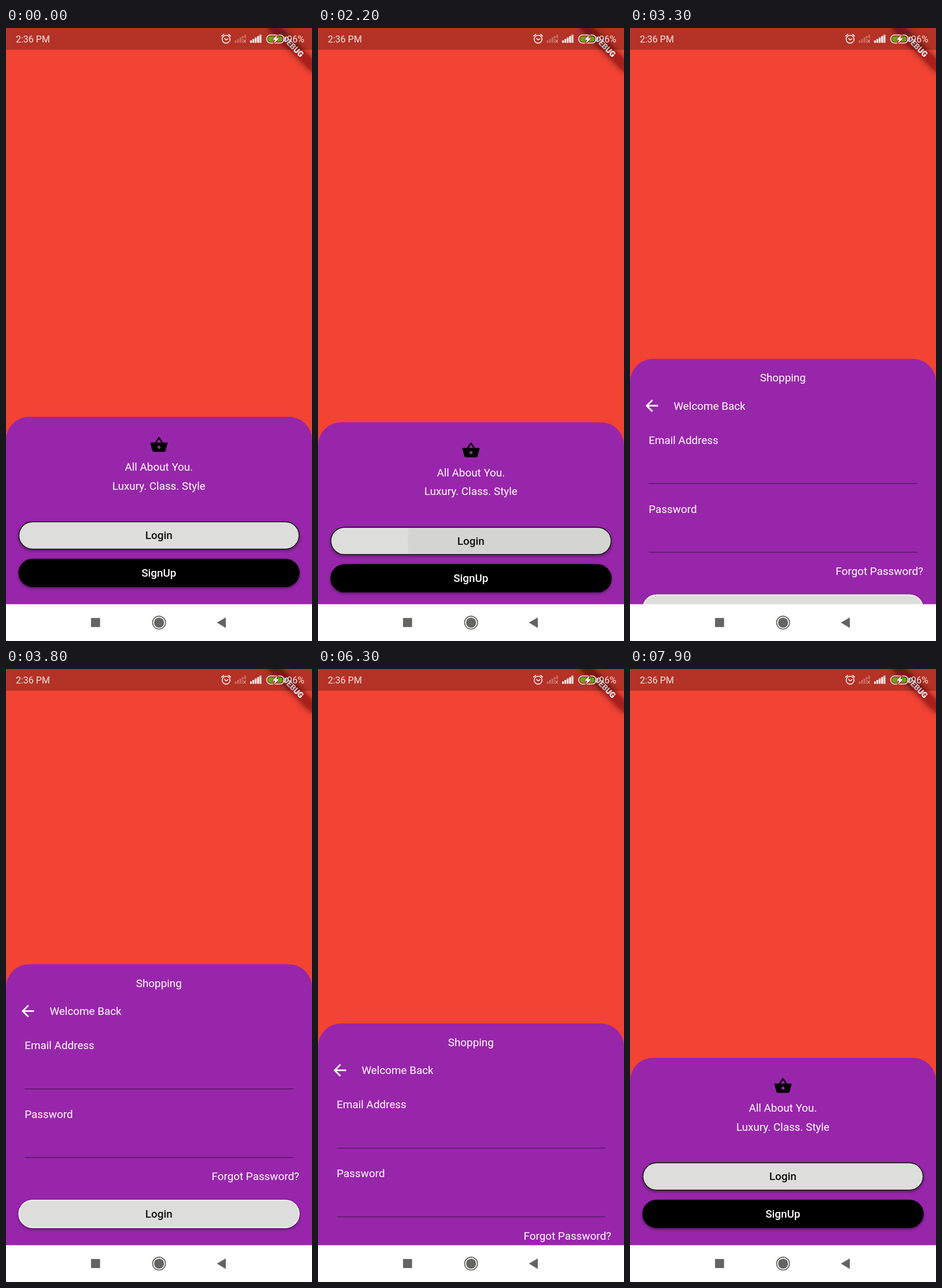
Animation, 529 px wide and 1058 px high, one loop 8000 ms. Source, as an HTML page with a canvas:

```html
<!DOCTYPE html>
<html lang="en">
<head>
<meta charset="utf-8">
<title>Shopping sign-in</title>
<style>
  html, body { margin: 0; width: 529px; height: 1058px; overflow: hidden; background: #f24333; }
  canvas { display: block; }
</style>
</head>
<body>
<canvas id="stage" width="529" height="1058"></canvas>
<script>
const ctx = document.getElementById('stage').getContext('2d');
const W = 529, H = 1058, NAV_TOP = 994.5, LOOP = 8000, STEP = 100;
const DP = 529 / 392.73;
const FONT = 'Roboto, "Noto Sans", sans-serif';
const RED = '#f24333', PURPLE = '#9826ab', GREY = '#dddedb', ICON = '#646563';

const HOME = { top: 671, height: 323.5, draw: drawHome };
const LOGIN = { top: 509.5, height: 485, draw: drawLogin };

// Each slide takes a sheet in or out at a given time.
const SLIDES = [
  { sheet: HOME, at: 2048, dur: 700, out: true },
  { sheet: LOGIN, at: 2892, dur: 700 },
  { sheet: LOGIN, at: 5941, dur: 700, out: true },
  { sheet: HOME, at: 6800, dur: 660 }
];
const TAP = { x: 375, y: 876, down: 1950, up: 2048 };

const basket = new Path2D('M17.21 9l-4.38-6.56c-.19-.28-.51-.42-.83-.42-.32 0-.64.14-.83.43L6.79 9H2c-.55 0-1 .45-1 1 0 .09.01.18.04.27l2.54 9.27c.23.84 1 1.46 1.92 1.46h13c.92 0 1.69-.62 1.93-1.46l2.54-9.27L23 10c0-.55-.45-1-1-1h-4.79zM9 9l3-4.4L15 9H9zm3 8c-1.1 0-2-.9-2-2s.9-2 2-2 2 .9 2 2-.9 2-2 2z');
const arrow = new Path2D('M20 11H7.83l5.59-5.59L12 4l-8 8 8 8 1.41-1.41L7.83 13H20v-2z');

const clamp = v => Math.min(1, Math.max(0, v));

// cubic-bezier(.25, .1, .25, 1)
function ease(x) {
  let lo = 0, hi = 1;
  for (let i = 0; i < 24; i++) {
    const s = (lo + hi) / 2;
    if (0.75 * s * (1 - s) + s * s * s < x) lo = s; else hi = s;
  }
  const s = (lo + hi) / 2, r = 1 - s;
  return 0.3 * s * r * r + 3 * s * s * r + s * s * s;
}

function text(str, x, y, { align = 'left', color = '#fff', weight = 400, size = 14 * DP } = {}) {
  ctx.font = `${weight} ${size}px ${FONT}`;
  ctx.textAlign = align;
  ctx.fillStyle = color;
  ctx.fillText(str, x, y);
}

function pill(x, y, w, h, r) {
  ctx.beginPath();
  ctx.roundRect(x, y, w, h, r);
}

function icon(path, x, y, color) {
  ctx.save();
  ctx.translate(x, y);
  ctx.scale(DP, DP);
  ctx.fillStyle = color;
  ctx.fill(path);
  ctx.restore();
}

function line(...pts) {
  ctx.beginPath();
  for (let i = 0; i < pts.length; i += 2) ctx.lineTo(pts[i], pts[i + 1]);
}

function button(label, y, fill, border, color, overlay) {
  const x = 21.6, w = 485.8, h = 48.5;
  ctx.save();
  ctx.shadowColor = 'rgba(0,0,0,.45)';
  ctx.shadowBlur = 5;
  ctx.shadowOffsetY = 2;
  pill(x, y, w, h, h / 2);
  ctx.fillStyle = fill;
  ctx.fill();
  ctx.restore();
  if (overlay) {
    ctx.save();
    pill(x, y, w, h, h / 2);
    ctx.clip();
    overlay();
    ctx.restore();
  }
  pill(x + 0.7, y + 0.7, w - 1.4, h - 1.4, h / 2 - 0.7);
  ctx.strokeStyle = border;
  ctx.lineWidth = 1.4;
  ctx.stroke();
  text(label, 264.3, y + h / 2 + 6.4, { align: 'center', color, weight: 500 });
}

function ripple(t) {
  const held = clamp((t - TAP.down) / 1000) * 150;
  const since = Math.max(0, t - TAP.up);
  const alpha = t < TAP.down ? 0 : 0.17 * (1 - clamp(since / 200));
  if (!alpha) return;
  ctx.beginPath();
  ctx.arc(TAP.x, TAP.y, Math.min(held, 15) + since * DP, 0, 7);
  ctx.fillStyle = `rgba(0,0,0,${alpha})`;
  ctx.fill();
}

function drawHome(t) {
  icon(basket, 248.3, 703.3, '#000');
  text('All About You.', 264.3, 764.2, { align: 'center' });
  text('Luxury. Class. Style', 264.3, 796.5, { align: 'center' });
  button('Login', 851.6, GREY, '#000', '#111', () => ripple(t));
  button('SignUp', 916.2, '#000', '#000', '#fff');
}

function drawLogin() {
  text('Shopping', 264.3, 548.5, { align: 'center' });
  icon(arrow, 21.6, 574.3, '#fff');
  text('Welcome Back', 75.4, 597);
  text('Email Address', 32.3, 656.3);
  text('Password', 32.3, 775);
  text('Forgot Password?', 507, 882.4, { align: 'right' });
  ctx.fillStyle = 'rgba(0,0,0,.42)';
  for (const y of [724, 842.6]) ctx.fillRect(32.3, y, 464.4, 1.4);
  button('Login', 916.2, GREY, '#fff', '#111');
}

function drawSheet(sheet, hidden, t) {
  if (hidden >= 1) return;
  ctx.save();
  ctx.translate(0, hidden * sheet.height);
  pill(0, sheet.top, W, 600, [40, 40, 0, 0]);
  ctx.fillStyle = PURPLE;
  ctx.fill();
  sheet.draw(t);
  ctx.restore();
}

function drawBanner() {
  const off = 40 * DP, h = 12 * DP;
  ctx.save();
  ctx.translate(W, 0);
  ctx.rotate(Math.PI / 4);
  ctx.filter = 'blur(5.3px)';
  ctx.fillStyle = 'rgba(0,0,0,.5)';
  ctx.fillRect(-off, off - h, off * 2, h);
  ctx.filter = 'none';
  ctx.fillStyle = 'rgba(183,28,28,.627)';
  ctx.fillRect(-off, off - h, off * 2, h);
  text('DEBUG', 0, off - h / 2 + 4.7, { align: 'center', weight: 900, size: 10.2 * DP });
  ctx.restore();
}

function signal(x, color) {
  ctx.fillStyle = color;
  for (let i = 0; i < 5; i++) {
    const h = 4 + i * 2.5;
    ctx.fillRect(x + i * 4.1, 25.5 - h, 3, h);
  }
}

function drawStatus() {
  const ink = '#f3e4e2';
  ctx.fillStyle = 'rgba(0,0,0,.26)';
  ctx.fillRect(0, 0, W, 37.5);
  text('2:36 PM', 17, 24.5, { color: ink, size: 16 });

  ctx.strokeStyle = ink;
  ctx.lineWidth = 1.7;
  ctx.lineCap = ctx.lineJoin = 'round';
  ctx.beginPath();
  ctx.arc(380.5, 19.3, 6.8, 0, 7);
  ctx.stroke();
  line(372.8, 14, 376.3, 11); ctx.stroke();
  line(388.2, 14, 384.7, 11); ctx.stroke();
  line(377.8, 18, 380.5, 20.6, 383.8, 18.4); ctx.stroke();

  const faint = 'rgba(255,225,220,.32)';
  ctx.save();
  ctx.beginPath();
  ctx.rect(394, 8, 15, 20);
  ctx.rect(409, 8, 8, 9.5);
  ctx.clip();
  signal(395.5, faint);
  ctx.restore();
  ctx.strokeStyle = 'rgba(255,225,220,.5)';
  ctx.lineWidth = 1.4;
  line(410.3, 20.5, 414.6, 25); ctx.stroke();
  line(414.6, 20.5, 410.3, 25); ctx.stroke();
  signal(422, '#fff');

  ctx.strokeStyle = ink;
  ctx.lineWidth = 1.6;
  pill(450.8, 12, 29.6, 14, 6.5);
  ctx.stroke();
  ctx.beginPath();
  ctx.arc(479, 19, 4.6, -0.8, 0.8);
  ctx.stroke();
  pill(453.4, 14.6, 24.4, 8.8, 4);
  ctx.fillStyle = '#5cb00c';
  ctx.fill();
  line(469.5, 11.5, 460.5, 20.2, 465.5, 20.2, 463, 26.6, 472.3, 17.8, 467.2, 17.8);
  ctx.closePath();
  ctx.strokeStyle = '#a53020';
  ctx.lineWidth = 2.2;
  ctx.stroke();
  ctx.fillStyle = '#fff';
  ctx.fill();
  text('96%', 486, 24.5, { color: ink, size: 16 });
}

function drawNav() {
  ctx.fillStyle = '#fdfefd';
  ctx.fillRect(0, NAV_TOP, W, H - NAV_TOP);
  ctx.fillStyle = ctx.strokeStyle = ICON;
  ctx.fillRect(147, 1018.3, 15.6, 15.6);
  ctx.beginPath();
  ctx.arc(264.6, 1026.3, 8.6, 0, 7);
  ctx.fill();
  ctx.beginPath();
  ctx.arc(264.6, 1026.3, 11.2, 0, 7);
  ctx.lineWidth = 1.6;
  ctx.stroke();
  line(364.6, 1026.3, 380, 1017.2, 380, 1035.4);
  ctx.fill();
}

function render(t) {
  let sheet = HOME, hidden = 0;
  for (const s of SLIDES) {
    if (t < s.at) break;
    const u = clamp((t - s.at) / s.dur);
    sheet = s.sheet;
    hidden = 1 - ease(s.out ? 1 - u : u);
    if (u === 1) hidden = s.out ? 1 : 0;
  }
  ctx.fillStyle = RED;
  ctx.fillRect(0, 0, W, H);
  drawSheet(sheet, hidden, t);
  drawBanner();
  drawStatus();
  drawNav();
}

const start = performance.now();
let last = -1;
function tick() {
  const t = Math.floor(((performance.now() - start) % LOOP) / STEP) * STEP;
  if (t !== last) render(last = t);
  requestAnimationFrame(tick);
}
tick();
</script>
</body>
</html>
```
